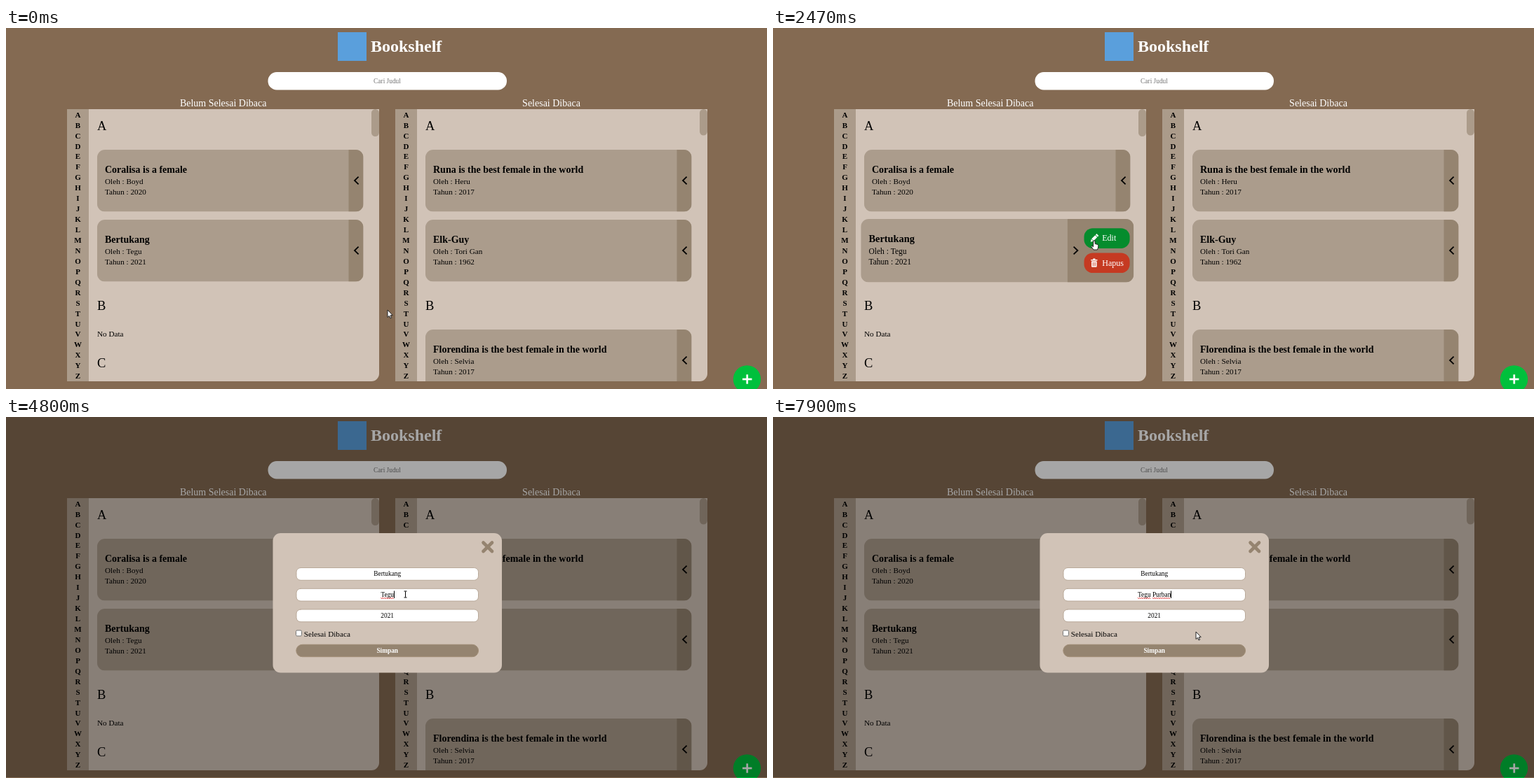
An HTML page with a canvas that plays this animation: 1085 px wide and 516 px high, repeating every 8000 ms.

```html
<!DOCTYPE html>
<html lang="id">
<head>
<meta charset="utf-8">
<title>Bookshelf</title>
<style>
html, body { margin: 0; width: 100%; height: 100%; overflow: hidden; background: #846a52; }
canvas { display: block; width: 1085px; height: 516px; }
</style>
</head>
<body>
<canvas id="stage" width="1085" height="516"></canvas>
<script>
const ctx = document.getElementById('stage').getContext('2d');
const LOOP = 8000;
const SERIF = '"Liberation Serif", "Times New Roman", serif';
const C = {
  page: '#846a52', panel: '#d1c3b7', side: '#ab9b8a', card: '#ab9c8c', strip: '#958470',
  green: '#00c03c', edit: '#058c2d', remove: '#c53a22', logo: '#5a9fdc'
};

// Stepped tracks: [start time, values...]
const CURSOR = [
  [0, 544, 403, 'arrow'], [810, 532, 375, 'arrow'], [960, 514, 350, 'arrow'],
  [1080, 502, 336, 'hand'], [1790, 480, 321, 'hand'], [1920, 459, 307, 'hand'],
  [2060, 458, 304, 'hand'], [2610, 458, 304, 'arrow'], [3010, 478, 314, 'arrow'],
  [3130, 520, 322, 'arrow'], [3260, 568, 306, 'arrow'], [3380, 594, 268, 'arrow'],
  [3530, 580, 258, 'beam'], [3660, 569, 253, 'beam'], [7620, 583, 278, 'beam'],
  [7750, 603, 306, 'arrow'], [7900, 603, 307, 'arrow']
];
const ZOOM = [[0, 1], [960, 1.002], [1080, 1.008], [1240, 1.025], [2740, 1.016], [2870, 1.005], [3010, 1]];
const SLIDE = [[0, 0], [1390, 0.3], [1520, 0.78], [1650, 1]];
const CARET = [[0, 0], [4800, 1], [5340, 0], [5480, 1], [7230, 0], [7620, 1]];
const KEYS = [5480, 5730, 5880, 6150, 6400, 6550, 6670];
const MODAL_AT = 2610, FOCUS_AT = 4800, CHECK_AT = 7620;

const TITLE = 'Bertukang', AUTHOR = 'Tegu', TYPED = ' Purban';

const at = (track, t) => track.filter(k => k[0] <= t).pop();

function box(x, y, w, h, fill, r = 0, line) {
  ctx.beginPath();
  ctx.roundRect(x, y, w, h, r);
  ctx.fillStyle = fill;
  ctx.fill();
  if (line) {
    ctx.strokeStyle = line;
    ctx.lineWidth = 1;
    ctx.stroke();
  }
}

function text(s, x, y, size, { bold = false, color = '#000', align = 'left' } = {}) {
  ctx.font = `${bold ? 'bold ' : ''}${size}px ${SERIF}`;
  ctx.fillStyle = color;
  ctx.textAlign = align;
  ctx.fillText(s, x, y);
}

function line(points, color, width, cap = 'butt') {
  ctx.beginPath();
  points.forEach(([x, y]) => ctx.lineTo(x, y));
  ctx.strokeStyle = color;
  ctx.lineWidth = width;
  ctx.lineCap = cap;
  ctx.stroke();
}

function shape(points, fill, stroke) {
  ctx.beginPath();
  points.forEach(([x, y]) => ctx.lineTo(x, y));
  ctx.closePath();
  ctx.fillStyle = fill;
  ctx.fill();
  if (stroke) {
    ctx.strokeStyle = stroke;
    ctx.lineWidth = 1;
    ctx.lineJoin = 'round';
    ctx.stroke();
  }
}

function chevron(x, y, dir) {
  line([[x - 2.8 * dir, y - 5.3], [x + 2.8 * dir, y], [x - 2.8 * dir, y + 5.3]], '#000', 1.8);
}

function pencil(x, y) {
  ctx.save();
  ctx.translate(x, y);
  ctx.rotate(Math.PI / 4);
  ctx.fillStyle = '#fff';
  ctx.fillRect(-2, -7, 4, 2.2);
  ctx.fillRect(-2, -4, 4, 7);
  shape([[-2, 3.6], [2, 3.6], [0, 7]], '#fff');
  ctx.restore();
}

function trash(x, y) {
  box(x - 4.5, y - 4.5, 9, 1.4, '#fff');
  box(x - 1.5, y - 6, 3, 1.5, '#fff');
  box(x - 3.7, y - 2.4, 7.4, 8.2, '#fff', 1);
  for (const dx of [-1.8, 0, 1.8]) line([[x + dx, y - 1], [x + dx, y + 4.5]], C.remove, 0.7);
}

function card(x, y, title, by, year, zoom = 1, slide = 0) {
  const w = 379.5, h = 88.5;
  ctx.save();
  ctx.translate(x + w / 2, y + h / 2);
  ctx.scale(zoom, zoom);
  ctx.translate(-w / 2, -h / 2);
  ctx.beginPath();
  ctx.roundRect(0, 0, w, h, 11);
  ctx.clip();
  box(0, 0, w, h, C.card);
  text(title, 11, 32.5, 14, { bold: true });
  text('Oleh : ' + by, 11, 48.5, 11.2);
  text('Tahun : ' + year, 11, 64, 11.2);
  const left = w - 21 - 71 * slide;
  box(left, 0, w - left, h, C.strip);
  chevron(left + 11.3, 44, slide > 0.5 ? 1 : -1);
  if (slide > 0) {
    const bx = left + 23;
    box(bx, 13, 63.5, 28, C.edit, 12);
    pencil(bx + 14, 27);
    text('Edit', bx + 25, 30.5, 11.8, { color: '#fff' });
    box(bx, 47.3, 63.5, 28, C.remove, 12);
    trash(bx + 14, 61.3);
    text('Hapus', bx + 25, 65, 11.8, { color: '#fff' });
  }
  ctx.restore();
}

function panel(x, thumb, content) {
  ctx.save();
  ctx.beginPath();
  ctx.roundRect(x, 116, 445, 389, [0, 0, 11, 0]);
  ctx.clip();
  box(x, 116, 445, 389, C.panel);
  box(x, 116, 31, 389, C.side);
  for (let i = 0; i < 26; i++) {
    text(String.fromCharCode(65 + i), x + 15.5, 127.7 + i * 14.94, 11, { bold: true, align: 'center' });
  }
  box(x + 434, 116, 11, thumb, C.side, 5.5);
  content(x + 43);
  ctx.restore();
}

function page(t) {
  box(0, 0, 1085, 516, C.page);
  box(473, 6, 41, 41, C.logo);
  text('Bookshelf', 520, 34, 24, { bold: true, color: '#fff' });
  box(373.5, 63, 340.5, 25.5, '#fff', 12.5);
  text('Cari Judul', 543.5, 79, 9.4, { color: '#757575', align: 'center' });
  text('Belum Selesai Dibaca', 309.7, 112, 14, { color: '#fff', align: 'center' });
  text('Selesai Dibaca', 777.5, 112, 14, { color: '#fff', align: 'center' });

  panel(87, 39, x => {
    text('A', x, 146, 18.5);
    card(x, 174, 'Coralisa is a female', 'Boyd', 2020);
    card(x, 274, TITLE, AUTHOR, 2021, at(ZOOM, t)[1], at(SLIDE, t)[1]);
    text('B', x, 403, 18.5);
    text('No Data', x, 441, 11.2);
    text('C', x, 484.5, 18.5);
  });
  panel(555, 37.5, x => {
    text('A', x, 146, 18.5);
    card(x, 174, 'Runa is the best female in the world', 'Heru', 2017);
    card(x, 274, 'Elk-Guy', 'Tori Gan', 1962);
    text('B', x, 403, 18.5);
    card(x, 431, 'Florendina is the best female in the world', 'Selvia', 2017);
  });

  ctx.beginPath();
  ctx.arc(1056.5, 502, 19.7, 0, 2 * Math.PI);
  ctx.fillStyle = C.green;
  ctx.fill();
  line([[1050, 502], [1063.5, 502]], '#fff', 2.7);
  line([[1056.75, 495.3], [1056.75, 508.7]], '#fff', 2.7);
}

function field(s, y) {
  box(414, y, 259.5, 17.8, '#fff', 6, '#b9a999');
  text(s, 543.7, y + 11.8, 9.33, { align: 'center' });
}

function squiggle(from, to, y) {
  const pts = [];
  for (let x = from, i = 0; x <= to; x += 1.4, i++) pts.push([x, y + (i % 2 ? 0.7 : -0.7)]);
  line(pts, '#e02020', 1);
}

function modal(t) {
  box(0, 0, 1085, 515, 'rgba(0,0,0,0.35)');
  box(380.5, 166, 326.5, 199.5, C.panel, 11);
  line([[680.5, 179.5], [693, 192]], C.strip, 4.6, 'round');
  line([[693, 179.5], [680.5, 192]], C.strip, 4.6, 'round');

  const typed = AUTHOR + TYPED.slice(0, KEYS.filter(k => k <= t).length);
  field(TITLE, 215.5);
  field(typed, 245.3);
  field('2021', 275);
  if (t >= FOCUS_AT) {
    const width = s => ctx.measureText(s).width;
    ctx.font = `9.33px ${SERIF}`;
    const left = 543.7 - width(typed) / 2, right = left + width(typed);
    squiggle(left, left + width(AUTHOR), 259);
    if (t >= CHECK_AT) squiggle(left + width(AUTHOR + ' '), right, 259);
    if (at(CARET, t)[1]) box(Math.round(right), 248.5, 1, 10.5, '#000');
  }

  box(413.5, 305, 8, 8, '#fff', 1.5, '#767676');
  text('Selesai Dibaca', 424.7, 313.8, 11.2);
  box(413.8, 325.3, 259.7, 17.4, C.strip, 8.7, '#a08d76');
  text('Simpan', 543.7, 337, 9.33, { bold: true, color: '#fff', align: 'center' });
}

const POINTERS = {
  arrow() {
    shape([[0, 0], [0, 10.5], [2.4, 8.4], [4, 12], [5.6, 11.3], [4.1, 7.8], [7.2, 7.6]], '#fff', '#222');
  },
  hand() {
    shape([[-1.2, 0], [1, 0], [1.3, 4.5], [5, 5.4], [6, 7], [5.4, 10.5], [4.4, 13],
      [-1, 13], [-4.2, 8.6], [-3.4, 7.3], [-1.5, 8.8]], '#fff', '#222');
  },
  beam() {
    line([[0.5, -3.5], [0.5, 4.5]], '#000', 1);
    for (const y of [-4, 5]) line([[-1.5, y], [2.5, y]], '#000', 1);
  }
};

function draw(t) {
  page(t);
  if (t >= MODAL_AT) modal(t);
  const [, x, y, kind] = at(CURSOR, t);
  ctx.save();
  ctx.translate(x, y);
  POINTERS[kind]();
  ctx.restore();
}

const start = performance.now();
function tick() {
  draw((performance.now() - start) % LOOP);
  requestAnimationFrame(tick);
}
tick();
</script>
</body>
</html>
```
